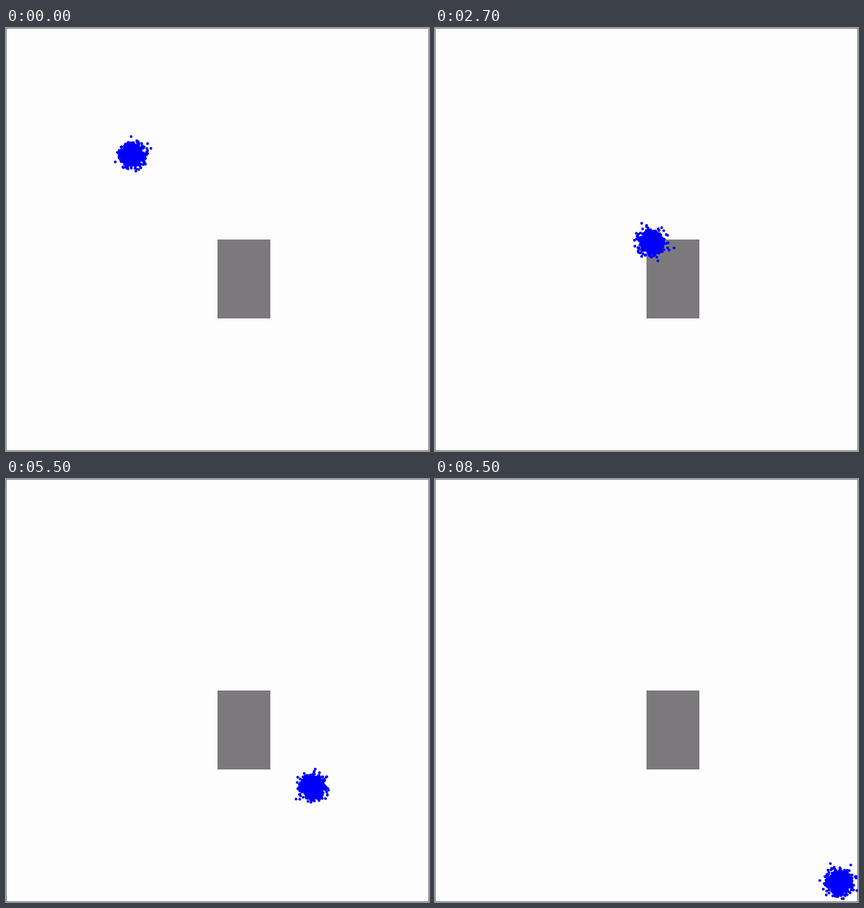
These frames come from a looping animation (600x600 px, 8.6 s). An HTML page with a canvas:

```html
<!DOCTYPE html>
<html lang="en">
<head>
<meta charset="utf-8">
<title>Particle cloud</title>
<style>
  html, body { margin: 0; width: 100%; height: 100%; overflow: hidden; background: #fefdfe; }
  canvas { display: block; }
</style>
</head>
<body>
<canvas id="stage" width="600" height="600"></canvas>
<script>
const ctx = document.getElementById('stage').getContext('2d');
const STEP_MS = 100, STEPS = 86, COUNT = 1000, TAU = Math.PI * 2;
const TRACKING_SPREAD = 7.6, DRIFT_SPREAD = 9;
// The cloud gets no position fix behind the block and diffuses.
const BLIND_FROM = 28, BLIND_TO = 38;
// step, x, y
const WAYPOINTS = [
  [0, 179, 180], [19, 267, 267], [27, 307, 304], [39, 376, 364],
  [45, 389, 390], [55, 435, 437], [65, 482, 481], [85, 574, 572]
];

let seed = 20;
function random() {
  seed = (seed + 0x6D2B79F5) | 0;
  let h = Math.imul(seed ^ (seed >>> 15), 1 | seed);
  h = (h + Math.imul(h ^ (h >>> 7), 61 | h)) ^ h;
  return ((h ^ (h >>> 14)) >>> 0) / 4294967296;
}

function scatter([x, y], spread) {
  const radius = spread * Math.sqrt(-2 * Math.log(1 - random()));
  const angle = TAU * random();
  return [x + radius * Math.cos(angle), y + radius * Math.sin(angle)];
}

function centerAt(step) {
  const next = Math.max(1, WAYPOINTS.findIndex(point => point[0] >= step));
  const [s0, x0, y0] = WAYPOINTS[next - 1];
  const [s1, x1, y1] = WAYPOINTS[next];
  const k = (step - s0) / (s1 - s0);
  return [x0 + (x1 - x0) * k, y0 + (y1 - y0) * k];
}

const clouds = [];
for (let step = 0; step < STEPS; step++) {
  const blind = step >= BLIND_FROM && step <= BLIND_TO;
  const center = centerAt(step);
  clouds.push(Array.from({ length: COUNT }, (_, i) => blind
    ? scatter(clouds[step - 1][i], DRIFT_SPREAD)
    : scatter(center, TRACKING_SPREAD)));
}

function draw(step) {
  ctx.fillStyle = '#fefdfe';
  ctx.fillRect(0, 0, 600, 600);
  ctx.fillStyle = '#7c797c';
  ctx.fillRect(300, 300, 75, 112);
  ctx.strokeStyle = '#858385';
  ctx.strokeRect(0.5, 0.5, 599, 599);

  ctx.fillStyle = '#0000fa';
  ctx.beginPath();
  for (const [x, y] of clouds[step]) {
    ctx.moveTo(x + 2, y);
    ctx.arc(x, y, 2, 0, TAU);
  }
  ctx.fill();
}

const start = performance.now();
function tick() {
  draw(Math.floor((performance.now() - start) / STEP_MS) % STEPS);
  requestAnimationFrame(tick);
}
tick();
</script>
</body>
</html>
```
